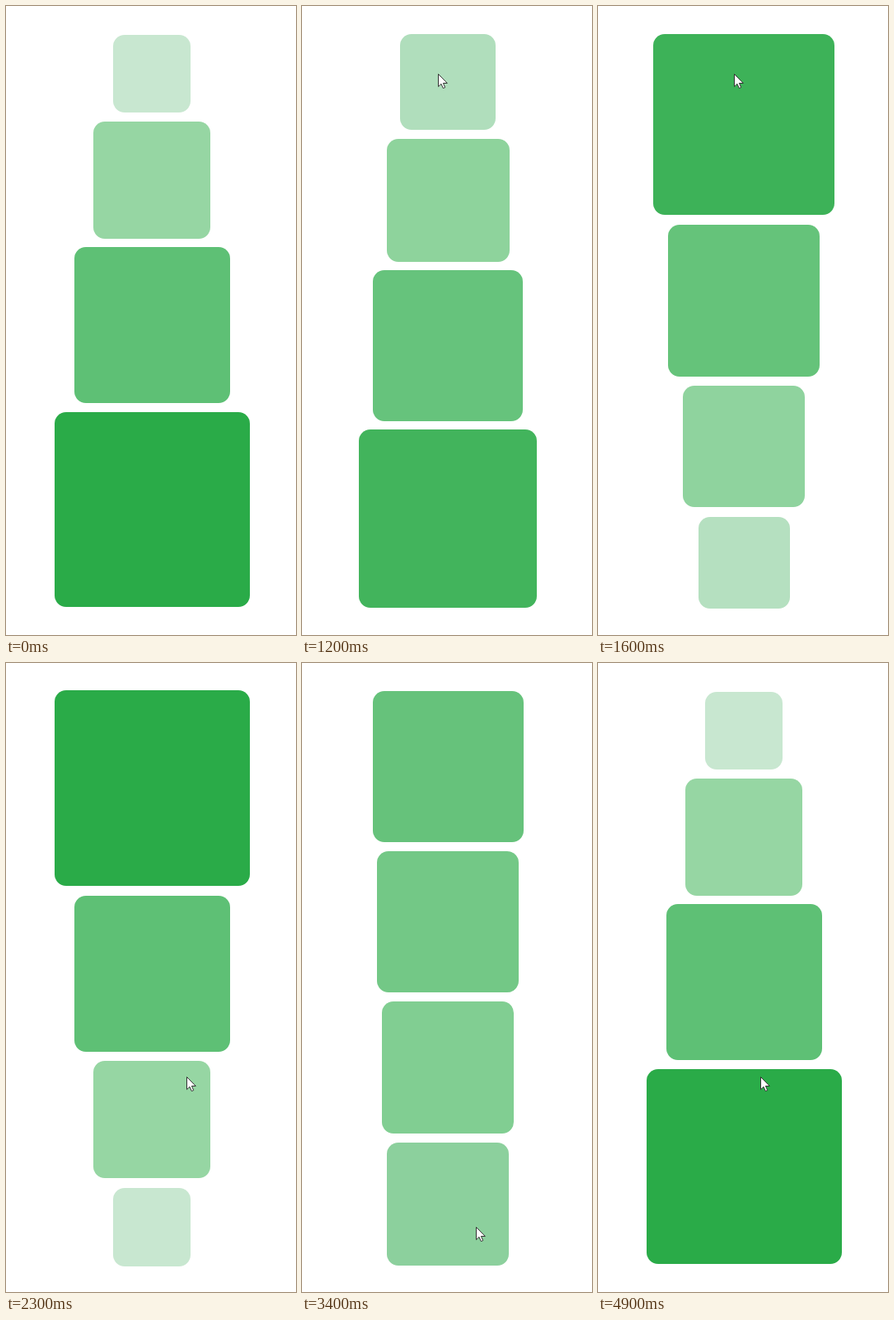
Recreate the animation shown at these times as an HTML page without scripts. Size 352 by 762 pixels, loop 5 s.

```html
<!DOCTYPE html>
<html lang="en">
<head>
<meta charset="utf-8">
<title>Stacked squares</title>
<style>
  @property --t { syntax: "<number>"; inherits: true; initial-value: 0; }
  @property --p { syntax: "<number>"; inherits: true; initial-value: 0; }

  html, body {
    margin: 0;
    width: 100%;
    height: 100%;
    overflow: hidden;
    background: #fff;
  }

  /* Clock in ms, ticking ten times a second */
  body {
    position: relative;
    animation: clock 5s steps(50) -4ms infinite;
  }
  @keyframes clock {
    from { --t: 0; }
    to { --t: 5000; }
  }

  /* --p: 0 = largest at the bottom, 1 = largest at the top */
  .stack {
    --x: clamp(0, (var(--t) - 1021) / 900, 1);
    --y: clamp(0, (var(--t) - 3099) / 900, 1);
    --u: (1 - var(--x) * var(--x));
    --v: (1 - var(--y) * var(--y));
    --p: calc(var(--v) * var(--v) * var(--v) * var(--v)
            - var(--u) * var(--u) * var(--u) * var(--u));
    position: absolute;
    left: 0;
    top: calc(34.5px - 1.1px * var(--p));
    width: 354.4px;
    display: flex;
    flex-direction: column;
    align-items: center;
    gap: calc(10.5px + 1.05px * var(--p));
  }

  .box {
    --size: calc(94.6px + 47.35px * (var(--i) + (3 - 2 * var(--i)) * var(--p)));
    flex: none;
    width: var(--size);
    height: var(--size);
    border-radius: 14px;
    background: color-mix(in srgb, var(--end) calc(var(--p) * 100%), var(--start));
  }
  .stack {
    --pale: #c8e7d0;
    --light: #96d6a3;
    --mid: #5ec075;
    --deep: #2aab48;
  }
  .box:nth-child(1) { --i: 0; --start: var(--pale);  --end: var(--deep); }
  .box:nth-child(2) { --i: 1; --start: var(--light); --end: var(--mid); }
  .box:nth-child(3) { --i: 2; --start: var(--mid);   --end: var(--light); }
  .box:nth-child(4) { --i: 3; --start: var(--deep);  --end: var(--pale); }

  .cursor {
    position: absolute;
    left: 0;
    top: 0;
    width: 14px;
    height: 20px;
    overflow: visible;
    fill: #fff;
    stroke: #333;
    stroke-width: 1;
    stroke-linejoin: round;
    animation: point 5s step-end -4ms infinite;
  }
  @keyframes point {
    0%   { opacity: 0; transform: translate(165px, 82px); }
    14%  { opacity: 1; transform: translate(165px, 82px); }
    42%  { transform: translate(163px, 55px); }
    44%  { transform: translate(190px, 270px); }
    46%  { transform: translate(219px, 501px); }
    48%  { transform: translate(214px, 640px); }
    50%  { transform: translate(211px, 700px); }
    52%  { transform: translate(211px, 690px); }
    54%  { transform: translate(211px, 683px); }
    94%  { transform: translate(208px, 640px); }
    96%  { transform: translate(201px, 550px); }
    98%  { opacity: 1; transform: translate(197px, 501px); }
    100% { opacity: 0; transform: translate(197px, 501px); }
  }
</style>
</head>
<body>
  <div class="stack">
    <div class="box"></div>
    <div class="box"></div>
    <div class="box"></div>
    <div class="box"></div>
  </div>
  <svg class="cursor" viewBox="0 0 14 20">
    <path d="M.5 .5V15.7L4 12.4 6.3 17.6 8.7 16.6 6.4 11.5H11.3Z"/>
  </svg>
</body>
</html>
```
